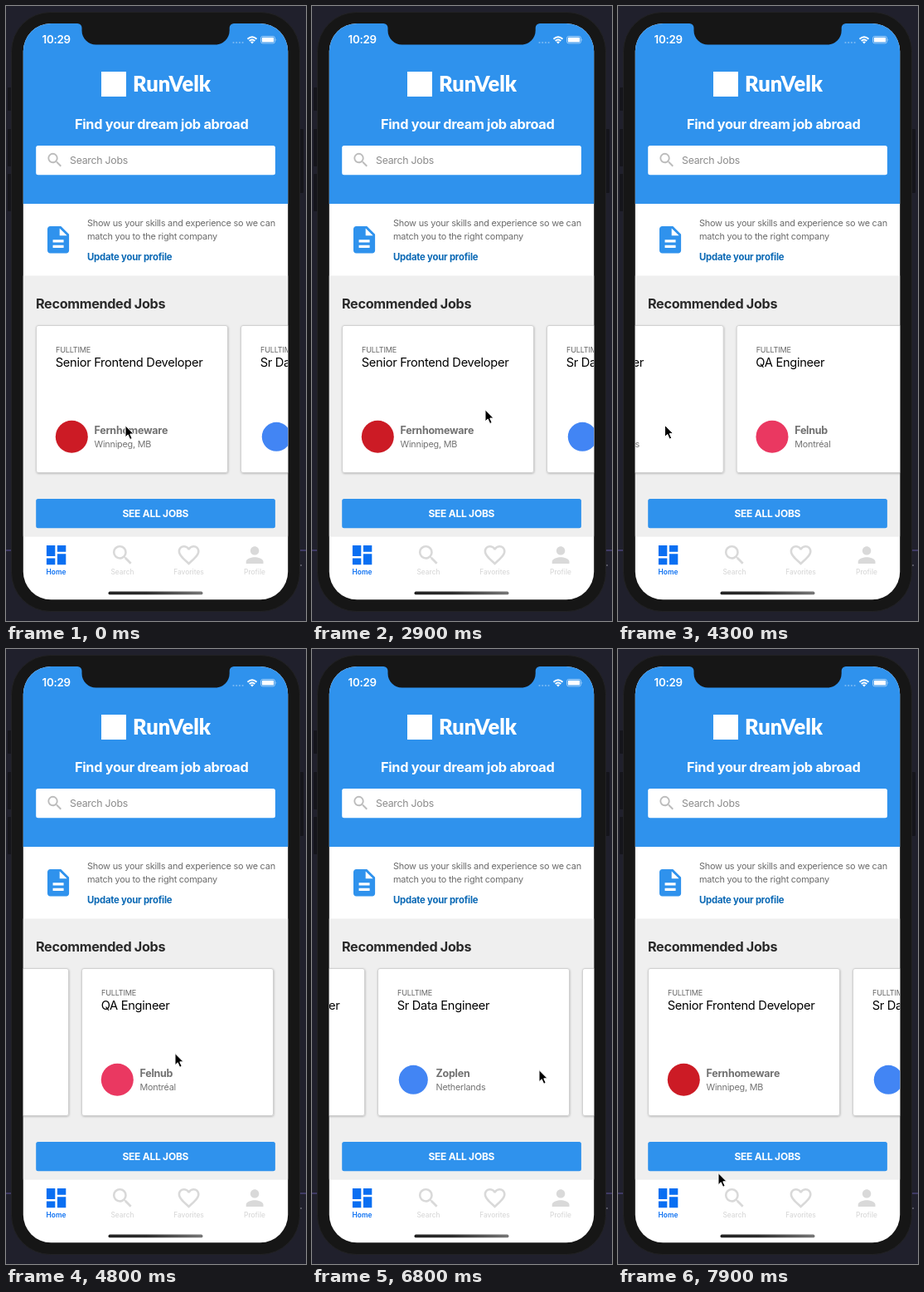
An HTML page for the animation above (8 s loop, 362x740 px).

```html
<!DOCTYPE html>
<html lang="en">
<head>
<meta charset="utf-8">
<title>Job search app</title>
<style>
  html, body { margin: 0; width: 100%; height: 100%; overflow: hidden; background: #20202c; }
  svg { display: block; width: 362px; height: 740px; }
  text { font-family: Inter, Roboto, sans-serif; letter-spacing: -0.02em; }
  .bold { font-weight: 700; }
  .mid { text-anchor: middle; }
  .note { font-size: 10.9px; fill: #6b6b6b; }
  .tab text { font-size: 8.4px; font-weight: 500; letter-spacing: 0; text-anchor: middle; }
  .tab { fill: #d9d9d9; }
  .tab.on { fill: #0a6ff2; }
  .tab.on text { font-weight: 600; }
  .kind { font-size: 9.1px; fill: #666; }
  .role { font-size: 14.65px; fill: #000; }
  .firm { font-size: 12.5px; font-weight: 700; fill: #717171; }
  .place { font-size: 10.8px; fill: #737373; }
</style>
</head>
<body>
<svg viewBox="0 0 362 740">
  <defs>
    <clipPath id="screen"><rect x="20.8" y="21" width="319.4" height="693.2" rx="33.5"/></clipPath>
    <filter id="shade" x="-5%" y="-5%" width="110%" height="112%">
      <feDropShadow dx="0.4" dy="0.8" stdDeviation="0.8" flood-color="#000" flood-opacity="0.25"/>
    </filter>
    <linearGradient id="bar"><stop stop-color="#222"/><stop offset=".4" stop-color="#2c2c2c"/><stop offset="1" stop-color="#777"/></linearGradient>
    <path id="lens" d="M15.5 14h-.79l-.28-.27A6.47 6.47 0 0 0 16 9.5 6.5 6.5 0 1 0 9.5 16c1.61 0 3.09-.59 4.23-1.57l.27.28v.79l5 4.99L20.49 19l-4.99-5zm-6 0C7.01 14 5 11.99 5 9.5S7.01 5 9.5 5 14 7.01 14 9.5 11.99 14 9.5 14z"/>
  </defs>

  <!-- Desktop and phone body -->
  <rect width="362" height="740" fill="#20202c"/>
  <path d="M0 655H362" stroke="#5f559c" stroke-width="1.2"/>
  <path d="M354 673H357" stroke="#8a8a96"/>
  <g fill="#15151b">
    <rect x="2" y="98" width="6" height="28" rx="1"/>
    <rect x="2" y="148" width="6" height="45" rx="1"/>
    <rect x="2" y="202" width="6" height="45" rx="1"/>
    <rect x="352" y="148" width="7" height="77" rx="1"/>
  </g>
  <rect x="6.5" y="7.5" width="348" height="721" rx="47" fill="#161616" stroke="#222225"/>

  <g clip-path="url(#screen)">
    <rect x="20" y="20" width="322" height="696" fill="#fff"/>
    <rect x="20" y="20" width="322" height="218" fill="#2f92ed"/>
    <rect x="20" y="324.5" width="322" height="313" fill="#efefef"/>

    <!-- Header -->
    <text x="43.6" y="45" font-size="13.3" font-weight="600" fill="#fff">10:29</text>
    <g fill="#fff" opacity="0.35">
      <circle cx="274.5" cy="44" r="1.1"/><circle cx="278.2" cy="44" r="1.1"/>
      <circle cx="281.9" cy="44" r="1.1"/><circle cx="285.6" cy="44" r="1.1"/>
    </g>
    <g fill="none" stroke="#fff" stroke-width="1.9">
      <path d="M291.5 39.8Q297 34.6 302.5 39.8"/>
      <path d="M293.7 42Q297 39 300.3 42"/>
    </g>
    <path d="M295 43.3Q297 41.7 299 43.3L297 45.5Z" fill="#fff"/>
    <rect x="307.5" y="36.5" width="17" height="8.4" rx="2.3" fill="none" stroke="#fff" stroke-opacity="0.5"/>
    <rect x="308.8" y="37.8" width="14.4" height="5.8" rx="1.2" fill="#fff"/>
    <path d="M325.6 39.2Q327 40.7 325.6 42.2Z" fill="#fff" opacity="0.6"/>

    <rect x="115" y="79" width="30" height="30" fill="#fff"/>
    <text x="153" y="103" font-size="25.5" font-weight="900" fill="#fff" style="font-family:Lato,sans-serif;letter-spacing:0">RunVelk</text>
    <text class="bold mid" x="187.7" y="148" font-size="16.35" fill="#fff">Find your dream job abroad</text>
    <rect x="36.2" y="168" width="288.7" height="35.2" rx="2.5" fill="#fff"/>
    <use href="#lens" transform="translate(47.5 174) scale(.95)" fill="#bcbcbc"/>
    <text x="77" y="190" font-size="12.3" fill="#8c8c8c">Search Jobs</text>

    <!-- Profile hint -->
    <path transform="translate(43.5 261.7) scale(1.63)" fill="#2f92ed" d="M14 2H6c-1.1 0-2 .9-2 2v16c0 1.1.9 2 2 2h12c1.1 0 2-.9 2-2V8l-6-6zm2 16H8v-2h8v2zm0-4H8v-2h8v2zm-3-5V3.5L18.5 9H13z"/>
    <text class="note" x="98" y="265">Show us your skills and experience so we can</text>
    <text class="note" x="98" y="280.5">match you to the right company</text>
    <text class="bold" x="98" y="306.3" font-size="11.35" fill="#0b69b5">Update your profile</text>

    <!-- Jobs -->
    <text class="bold" x="36" y="364" font-size="16.2" fill="#2a2a2a">Recommended Jobs</text>
    <g id="cards"></g>
    <rect x="36.2" y="593" width="288.7" height="35.2" rx="2.5" fill="#2f92ed"/>
    <text class="bold mid" x="180.3" y="614.8" font-size="12" fill="#fff">SEE ALL JOBS</text>

    <!-- Tab bar -->
    <path d="M20 638H342" stroke="#dedede" stroke-width="0.7"/>
    <g class="tab on">
      <path transform="translate(45 645) scale(1.3)" d="M3 13h8V3H3v10zm0 8h8v-6H3v6zm10 0h8V11h-8v10zm0-18v6h8V3h-8z"/>
      <text x="60.5" y="684">Home</text>
    </g>
    <g class="tab">
      <use href="#lens" transform="translate(125 645) scale(1.3)"/>
      <text x="140.5" y="684">Search</text>
    </g>
    <g class="tab">
      <path transform="translate(205 645) scale(1.3)" d="M16.5 3c-1.74 0-3.41.81-4.5 2.09C10.91 3.81 9.24 3 7.5 3 4.42 3 2 5.42 2 8.5c0 3.78 3.4 6.86 8.55 11.54L12 21.35l1.45-1.32C18.6 15.36 22 12.28 22 8.5 22 5.42 19.58 3 16.5 3zm-4.4 15.55l-.1.1-.1-.1C7.14 14.24 4 11.39 4 8.5 4 6.5 5.5 5 7.5 5c1.54 0 3.04.99 3.57 2.36h1.87C13.46 5.99 14.96 5 16.5 5c2 0 3.5 1.5 3.5 3.5 0 2.89-3.14 5.74-7.9 10.05z"/>
      <text x="220.5" y="684">Favorites</text>
    </g>
    <g class="tab">
      <path transform="translate(284.5 645) scale(1.3)" d="M12 12c2.21 0 4-1.79 4-4s-1.79-4-4-4-4 1.79-4 4 1.79 4 4 4zm0 2c-2.67 0-8 1.34-8 4v2h16v-2c0-2.66-5.33-4-8-4z"/>
      <text x="300" y="684">Profile</text>
    </g>
    <rect x="123.5" y="704.5" width="114" height="3.8" rx="1.9" fill="url(#bar)"/>
    <path d="M86.3 20V21A5.2 5.2 0 0 1 91.5 26.2V29.5A17 17 0 0 0 108.5 46.5H252.7A17 17 0 0 0 269.7 29.5V26.2A5.2 5.2 0 0 1 274.9 21V20Z" fill="#161616"/>
  </g>

  <path id="cursor" d="M0 0V14.2L3.2 11.2L5.7 16.8L8.2 15.7L5.8 10.3H10.2Z" fill="#000" stroke="#fff" stroke-width="1" stroke-linejoin="round"/>
</svg>
<script>
  const LOOP = 8000, STEP = 100, PITCH = 247;
  const jobs = [
    { role: "Senior Frontend Developer", firm: "Fernhomeware", place: "Winnipeg, MB", color: "#cc1b25", r: 19.5 },
    { role: "Sr Data Engineer", firm: "Zoplen", place: "Netherlands", color: "#4285f4", r: 17.5 },
    { role: "QA Engineer", firm: "Felnub", place: "Montréal", color: "#ea3861", r: 19.5 }
  ];

  const smooth = u => u * u * (3 - 2 * u);
  const glide = u => 1 - (1 - u) ** 3;
  const linear = u => u;

  // Each key: time, value, easing used to arrive there.
  const scrollKeys = [
    [3000, 0], [3500, 162, smooth], [4000, 162], [4700, 439, glide],
    [5600, 439], [5800, 418, linear], [6100, 216, glide], [6600, 216],
    [6800, 204, linear], [7000, 137, linear], [7600, 0, glide]
  ];
  const xKeys = [
    [1600, 144], [2600, 209, smooth], [3000, 209], [3500, 29, smooth], [4000, 29],
    [4100, 20, linear], [4800, 204, smooth], [4900, 204], [5600, 133, smooth],
    [5800, 154, linear], [6100, 262, glide], [6600, 262], [6800, 274, linear],
    [7000, 341, linear], [7600, 121, smooth]
  ];
  const yKeys = [
    [1600, 504.7], [2600, 485.7, smooth], [3000, 485.7], [3500, 512.5, smooth], [4000, 512.5],
    [4800, 486.5, smooth], [4900, 486.5], [5600, 497.5, smooth], [5800, 497.5],
    [6100, 506.5, smooth], [7000, 506.5], [7600, 630.5, smooth]
  ];
  const fadeKeys = [[5600, 1], [5800, 0.3, linear], [6000, 1, linear]];

  function at(keys, t) {
    const i = keys.findIndex(k => k[0] > t);
    if (i === 0) return keys[0][1];
    if (i < 0) return keys[keys.length - 1][1];
    const [t0, a] = keys[i - 1], [t1, b, ease = linear] = keys[i];
    return a + (b - a) * ease((t - t0) / (t1 - t0));
  }

  const cards = document.getElementById("cards");
  const cursor = document.getElementById("cursor");
  cards.innerHTML = jobs.map((job, i) => `
    <g transform="translate(${36 + i * PITCH} 384)">
      <rect x=".5" y=".5" width="231" height="177" rx="2.5" fill="#fff" stroke="#c9c9c9" stroke-width=".8" filter="url(#shade)"/>
      <text class="kind" x="24" y="32.5">FULLTIME</text>
      <text class="role" x="23.7" y="50">${job.role}</text>
      <circle cx="43.3" cy="134.3" r="${job.r}" fill="${job.color}"/>
      <text class="firm" x="70.5" y="131">${job.firm}</text>
      <text class="place" x="70.5" y="147">${job.place}</text>
    </g>`).join("");

  function draw(t) {
    cards.setAttribute("transform", `translate(${-at(scrollKeys, t)} 0)`);
    cards.lastElementChild.setAttribute("opacity", at(fadeKeys, t));
    cursor.setAttribute("transform", `translate(${at(xKeys, t)} ${at(yKeys, t)})`);
  }

  const start = performance.now();
  function tick() {
    const t = (performance.now() - start) % LOOP;
    draw(Math.floor(t / STEP) * STEP);
    requestAnimationFrame(tick);
  }
  draw(0);
  requestAnimationFrame(tick);
</script>
</body>
</html>
```
